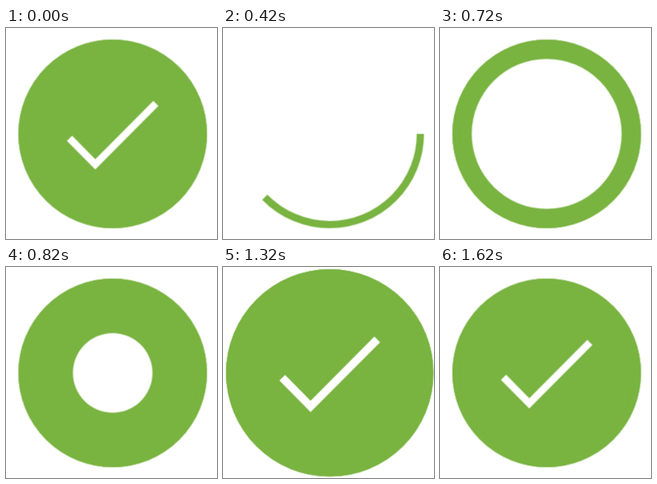
Recreate the animation shown at these times as an HTML page. Size 264 by 264 pixels, loop 1.88 s.

```html
<!DOCTYPE html>
<html lang="en">
<head>
<meta charset="utf-8">
<title>Success check</title>
<style>
  :root {
    --green: #79b340;
    --loop: 1880ms linear infinite;
  }
  html, body {
    margin: 0;
    width: 100%;
    height: 100%;
    overflow: hidden;
    background: #fff;
  }
  .badge {
    position: absolute;
    left: 15px;
    top: 14px;
    width: 236px;
    height: 236px;
    border-radius: 50%;
    translate: .5px .5px;
    animation: fill var(--loop), pulse var(--loop);
  }
  svg {
    display: block;
    width: 100%;
    height: 100%;
    fill: none;
    stroke-width: 2;
  }
  .ring {
    stroke: var(--green);
    stroke-dasharray: 166;
    animation: ring var(--loop);
  }
  .check {
    stroke: #fff;
    stroke-dasharray: 48;
    animation: check var(--loop);
  }

  /* Each loop opens on a brief finished badge, then clears and redraws. */
  @keyframes ring {
    0%, 1.06% { stroke-dashoffset: 0; }
    1.061% { stroke-dashoffset: 166; }
    4.628% { stroke-dashoffset: 166; animation-timing-function: cubic-bezier(.65, 0, .45, 1); }
    41.915%, 100% { stroke-dashoffset: 0; }
  }
  @keyframes fill {
    0%, 1.06% { box-shadow: inset 0 0 0 126.4px var(--green); }
    1.061% { box-shadow: inset 0 0 0 0 var(--green); }
    31.01% { box-shadow: inset 0 0 0 0 var(--green); animation-timing-function: ease-in-out; }
    55.21%, 100% { box-shadow: inset 0 0 0 126.4px var(--green); }
  }
  @keyframes check {
    0%, 1.06% { stroke-dashoffset: 0; }
    1.061% { stroke-dashoffset: 48; }
    55.106% { stroke-dashoffset: 48; animation-timing-function: cubic-bezier(.65, 0, .45, 1); }
    73.72%, 100% { stroke-dashoffset: 0; }
  }
  @keyframes pulse {
    0% { transform: none; }
    60.64% { transform: none; animation-timing-function: ease-in-out; }
    70.32% { transform: scale(1.1); animation-timing-function: ease-in-out; }
    80%, 100% { transform: none; }
  }
</style>
</head>
<body>
  <div class="badge">
    <svg viewBox="0 0 52 52">
      <circle class="ring" cx="26" cy="26" r="25"/>
      <path class="check" d="M14.1 27.2l7.1 7.2 16.7-16.8"/>
    </svg>
  </div>
</body>
</html>
```
